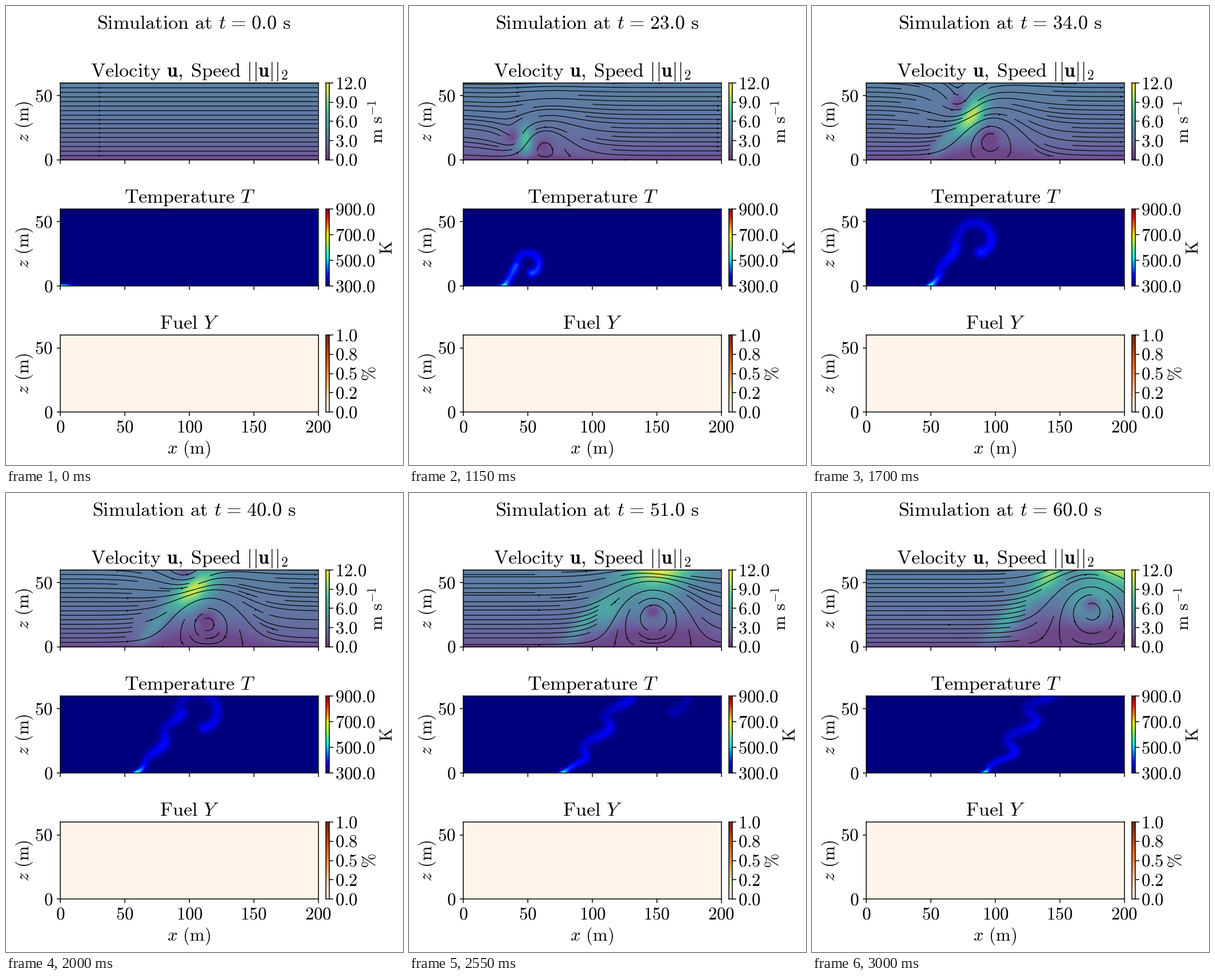
A matplotlib script that plays this animation: 695x805 px, repeating every 3.05 s.

```python
import numpy as np
import matplotlib
import matplotlib.pyplot as plt
from matplotlib.animation import FuncAnimation

matplotlib.rcParams["mathtext.fontset"] = "cm"

W, H, DPI = 695, 805, 100
PT = 72 / DPI
FRAMES, STEP = 61, 50
BIG, SMALL = 34, 30.7
LEFT, WIDE, TALL = 95.5, 451, 135
TOPS = 135, 356, 577
GAP = r"\hspace{0.38}"

fig = plt.figure(figsize=(W / DPI, H / DPI), dpi=DPI, facecolor="white")


def label(x, y, body, size=SMALL, ha="center", rot=0):
    return fig.text(x / W, 1 - y / H, f"${body}$", fontsize=size * PT, ha=ha,
                    va="baseline", rotation=rot, rotation_mode="anchor")


def panel(x, top, w):
    ax = fig.add_axes([x / W, 1 - (top + TALL) / H, w / W, TALL / H])
    for spine in ax.spines.values():
        spine.set_linewidth(1.5 * PT)
    ax.tick_params(length=6.5 * PT, width=1.5 * PT, labelbottom=False,
                   labelleft=False, labelright=False)
    return ax


def field_panel(top, title):
    ax = panel(LEFT, top, WIDE)
    ax.set_xlim(0, 200)
    ax.set_ylim(0, 60)
    ax.set_xticks(range(0, 201, 50))
    ax.set_yticks([0, 50])
    for z in (0, 50):
        label(82, top + TALL * (1 - z / 60) + 10, z, ha="right")
    label(40, top + 68, r"z" + GAP + r"\mathrm{(m)}", rot=90)
    label(321.5, top - 11, title, BIG)
    return ax


def color_bar(top, cmap, texts, unit, unit_x, alpha=1):
    ax = panel(560, top, 5.5)
    ax.imshow(np.linspace(0, 1, 256)[:, None], cmap=cmap, origin="lower",
              aspect="auto", extent=(0, 1, 0, 1), alpha=alpha)
    ax.set_xticks([])
    ax.yaxis.tick_right()
    ax.tick_params(labelright=False)
    ticks = np.linspace(0, 1, len(texts))
    ax.set_yticks(ticks)
    for f, s in zip(ticks, texts):
        label(576.5, top + TALL * (1 - f) + 10, s, ha="left")
    label(unit_x, top + 68, unit, rot=90)


def grid(nx, nz):
    return np.meshgrid(np.linspace(0, 200, nx, dtype="f4"),
                       np.linspace(0, 60, nz, dtype="f4"))


X, Z = grid(226, 68)
GX, GZ = grid(81, 41)


def ramp(t, a, b):
    return min(1, max(0, (t - a) / (b - a)))


def wind(z):
    return 3.7 * (z / 60) ** 0.25


def front(t):
    """Burning edge: starts slowly, then moves at a steady pace."""
    a = 1.65 * t - 7
    return (a + np.hypot(a, 6)) / 2


def head(t):
    """Centre of the large eddy that drifts away downwind."""
    return np.array([max(front(t), 3.05 * t - 8), max(1, 0.6 * (t - 4))])


def crown(t):
    """Fast jet turning clockwise round the eddy: position and direction."""
    deg = min(165, 165 - 3 * (t - 23))
    a = np.radians(deg)
    return head(t) + 0.63 * t * np.array([np.cos(a), np.sin(a)]), deg - 75


def lull(t):
    """Counter eddy on the far side of the jet."""
    c = crown(t)[0]
    return c + 0.65 * (c - head(t))


def gauss(x, z, a, b, amp, deg=0):
    c, s = np.cos(np.radians(deg)), np.sin(np.radians(deg))
    dx, dz = X - x, Z - z
    p, q = (dx * c + dz * s) / a, (dz * c - dx * s) / b
    return amp * np.exp(-(p * p + q * q) / 2)


def speed(t):
    n = max(t, 5)
    c, deg = crown(t)
    h, calm = head(t), lull(t)
    stem = 0.5 * t * np.array([np.cos(0.87), np.sin(0.87)])
    late = t - 56
    total = wind(Z) + gauss(*c, 0.35 * n, 0.17 * n, min(7.5, 0.22 * t), deg)
    total += gauss(front(t) + stem[0], stem[1], 0.33 * n, 0.09 * n, 0.06 * t, 50)
    total += gauss(130 + 3.25 * late, 44 + 3.25 * late, 13, 6.5,
                   5.5 * ramp(t, 44, 57), 57)
    total += gauss(*h, 14, 13, 4 * ramp(t, 38, 60))
    total += gauss(*h, 5, 4.5, -0.075 * t)
    total += gauss(*calm, 5, 5, -min(2.6, 0.08 * t))
    total += gauss(h[0], 0, 0.58 * n, max(2, 0.5 * (t - 18)), -min(3, 0.065 * t))
    return np.clip(total, np.minimum(wind(Z), 0.8), 12)


def flow(t):
    u, v = wind(GZ), np.zeros_like(GZ)
    eddies = ((head(t), min(8, 0.2 * t), 0.38 * t + 1),
              (lull(t), -min(4, 0.12 * t), 0.28 * t + 1))
    for (x, z), peak, core in eddies:
        dx, dz = GX - x, GZ - z
        r2 = dx ** 2 + dz ** 2 + 1e-3
        swirl = 1.4 * peak * core / r2 * (1 - np.exp(-1.26 * r2 / core ** 2))
        swirl *= np.exp(-r2 / 42 ** 2)
        u = u + swirl * dz
        v = v - swirl * dx
    return u, v * np.tanh(GZ / 6)


def ribbon(x, z, hot, width):
    x, z, hot, width = (np.asarray(k, "f4")[:, None, None]
                        for k in (x, z, hot, width))
    return (hot * np.exp(-((X - x) ** 2 + (Z - z) ** 2) / width ** 2)).max(0)


def heat(t):
    s = np.linspace(0, 1, 60)
    x0 = front(t)
    base = (60 + 100 * np.exp((14 - t) / 10)) * ramp(t, 0, 6) if t < 14 \
        else 60 + 100 * np.exp((14 - t) / 10)
    wide = 0.8 + min(3.2, 0.1 * t)

    # Hook curling clockwise round its centre
    hx, hz = crown(t)[0] + (0.1 * t, 0.05 * t)
    a = np.radians(180 - 250 * s)
    r = 0.41 * t * (1 - 0.25 * s ** 2)
    hook = ribbon(hx + r * np.cos(a), hz + r * np.sin(a),
                  base * (0.6 + 0.7 * s ** 2) * (1 - 0.75 * ramp(t, 36, 54)),
                  np.full(60, wide))

    # Stem from the flame up to the hook, with waves that climb it
    end = min(hx - 0.41 * t, x0 + 50)
    z = hz * s ** 1.3
    wave = -np.cos(2 * np.pi * (z - 3.25 * t) / 24)
    sway = 0.2 * max(0, t - 25) * np.minimum(1, z / 12) * wave
    stem = ribbon(x0 + (end - x0) * s + sway, z,
                  base * (1.1 - 0.4 * z / 60 + 0.25 * wave) +
                  200 * ramp(t, 0, 6) * np.exp(-z / 2.5),
                  0.8 + (wide - 0.8) * np.minimum(1, 0.25 + 1.6 * s))

    flame = gauss(x0, 0, 2.5 + 3 * np.exp(-t / 4), 0.6, 270)
    return 300 + np.maximum(np.maximum(hook, stem), flame)


def arrow_spot(path, t):
    a, b = path[0, 0], path[-1, 0]
    if a > 5 and b < 195:
        return path[len(path) // 2]
    if b - a < 80 or b < 195:
        return None
    x = 30.5 + 0.6 * max(0, t - 4) if a < 5 else 197.5
    return x, np.interp(x, path[:, 0], path[:, 1])


title = label(329, 39, "0", BIG)
ax_u = field_panel(TOPS[0], r"\mathrm{Velocity}" + GAP +
                   r"\mathbf{u},\hspace{0.25}\mathrm{Speed}" + GAP +
                   r"|\hspace{0.03}|\mathbf{u}|\hspace{0.03}|_2")
ax_t = field_panel(TOPS[1], r"\mathrm{Temperature}" + GAP + "T")
ax_f = field_panel(TOPS[2], r"\mathrm{Fuel}" + GAP + "Y")
for k in range(0, 201, 50):
    label(LEFT + WIDE * k / 200, 747, k)
label(320, 785, "x" + GAP + r"\mathrm{(m)}")

color_bar(TOPS[0], "viridis", ("0.0", "3.0", "6.0", "9.0", "12.0"),
          r"\mathrm{m}" + GAP + r"\mathrm{s}^{-1}", 661, 0.8)
color_bar(TOPS[1], "jet", ("300.0", "500.0", "700.0", "900.0"),
          r"\mathrm{K}", 676)
color_bar(TOPS[2], "Oranges", ("0.0", "0.2", "0.5", "0.8", "1.0"), r"\%", 646)

view = dict(origin="lower", aspect="auto", extent=(0, 200, 0, 60),
            interpolation="bilinear")
img_u = ax_u.imshow(speed(0), cmap="viridis", vmin=0, vmax=12, alpha=0.8, **view)
img_t = ax_t.imshow(heat(0), cmap="jet", vmin=300, vmax=900, **view)
ax_f.set_facecolor("#fef4ea")
burnt, = ax_f.plot([], [], color="white", lw=0.9 * PT, solid_capstyle="butt")
heads, = ax_u.plot([], [], ">", color="black", ms=3.6 * PT, mew=0, zorder=4)
drawn = []


def update(i):
    t = float(i)
    title.set_text(r"$\mathrm{Simulation}" + GAP + r"\mathrm{at}" + GAP +
                   r"t\hspace{0.116}=\hspace{0.116}" + f"{t:.1f}" + GAP +
                   r"\mathrm{s}$")
    img_u.set_data(speed(t))
    img_t.set_data(heat(t))

    while drawn:
        drawn.pop().remove()
    lines = ax_u.streamplot(GX, GZ, *flow(t), density=0.6, color="black",
                            linewidth=1.2 * PT, arrowsize=0.1).lines
    drawn.append(lines)
    for patch in list(ax_u.patches):
        patch.remove()
    spots = [arrow_spot(np.asarray(p), t) for p in lines.get_segments()]
    spots = np.array([s for s in spots if s is not None]).reshape(-1, 2)
    heads.set_data(spots[:, 0], spots[:, 1])

    burnt.set_data([0, front(t) if i else 0], [0.45, 0.45])
    return []


anim = FuncAnimation(fig, update, frames=FRAMES, interval=STEP,
                     init_func=lambda: [], repeat=True, repeat_delay=0, blit=False)
plt.show()
```
